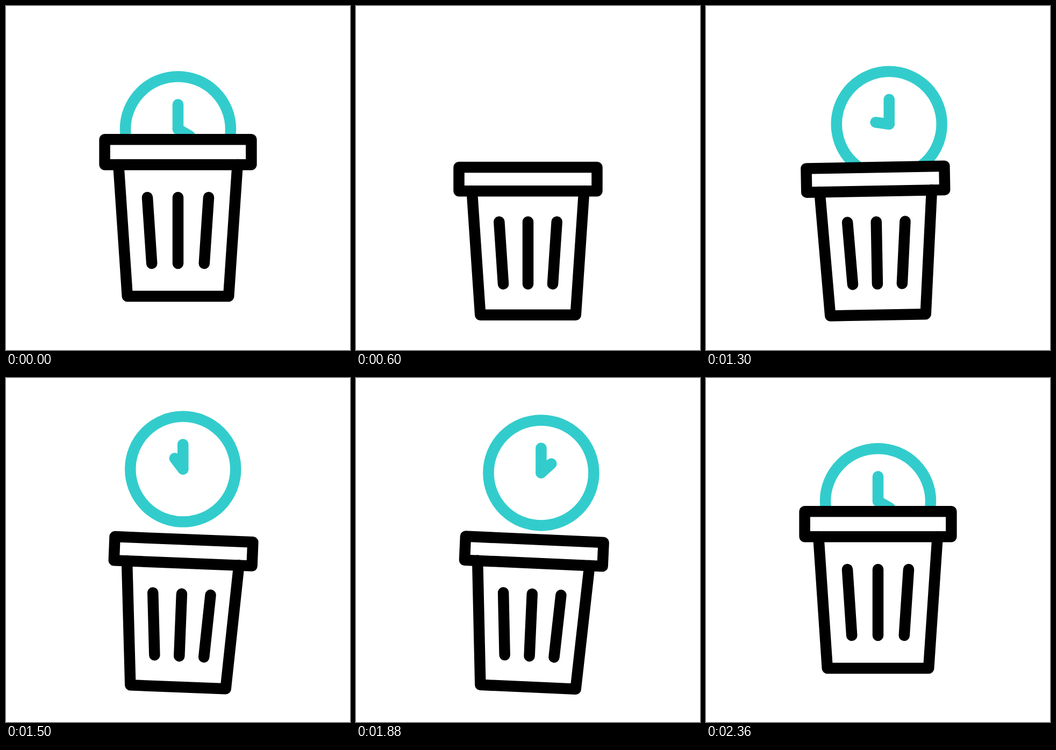
Write an HTML page that moves like this. It is 640 by 640 pixels and loops after 2.4 s.

```html
<!DOCTYPE html>
<html lang="en">
<head>
<meta charset="utf-8">
<title>Clock in a bin</title>
<style>
  html, body { margin: 0; width: 100%; height: 100%; overflow: hidden; background: #fff; }
  svg { display: block; width: 100%; height: 100%; }
  g { fill: none; stroke-width: 20.5; stroke-linecap: round; stroke-linejoin: round; }
</style>
</head>
<body>
<svg viewBox="0 0 640 640">
  <g id="clock" stroke="#33cccc">
    <circle r="98"/>
    <path d="M0 0V-46"/>
    <path id="hour" d="M0 0V-25.4"/>
  </g>
  <!-- bin coordinates start at the middle of its base -->
  <g id="bin" stroke="#000">
    <rect x="-600" y="-291.7" width="1200" height="700" fill="#fff" stroke="none"/>
    <path d="M-110.7 -245L-94.2 0H94.2L110.7 -245"/>
    <path d="M-136.4 -291.7H136.4V-244.7H-136.4Z"/>
    <path d="M-57 -184L-48.8 -61M0 -184V-61M57 -184L48.8 -61"/>
  </g>
</svg>
<script>
const LOOP = 2400;
const clock = document.getElementById('clock');
const hour = document.getElementById('hour');
const bin = document.getElementById('bin');

const smooth = p => p * p * (3 - 2 * p);
const part = (t, from, to) => Math.min(1, Math.max(0, (t - from) / (to - from)));
const ramp = (t, from, to) => smooth(part(t, from, to));

// eased swing through `count` alternating peaks, at rest before and after
function swing(t, start, step, count, peak) {
  const n = (t - start) / step;
  const k = Math.floor(n);
  const at = i => i >= 1 && i <= count ? peak(i, i % 2 ? -1 : 1) : 0;
  return at(k) + (at(k + 1) - at(k)) * smooth(n - k);
}

function draw(t) {
  const down = ramp(t, 200, 600);
  const up = ramp(t, 2000, 2362);

  const sink = down - up;
  const scale = 1 - 0.058 * sink ** 1.35;
  const tilt = swing(t, 1020, 192, 4, (i, side) => side * (i > 2 ? 4.9 : 9.7));
  bin.setAttribute('transform',
    `translate(320 ${540 + 34.8 * sink}) rotate(${tilt}) scale(${scale})`);
  bin.style.strokeWidth = 20.5 / scale;

  const x = 320 + swing(t, 1068.5, 97, 12, (i, side) => 1.5 + 63 * side);
  const y = 229.2 + 215.8 * down - 275.4 * ramp(t, 1010, 1410)
    + 8.9 * part(t, 1500, 2000) + 50.7 * up;
  clock.setAttribute('transform', `translate(${x} ${y})`);
  hour.setAttribute('transform', `rotate(${120 + 360 * part(t, 600, 2200)})`);
}

const start = performance.now();
function tick() {
  draw((performance.now() - start) % LOOP);
  requestAnimationFrame(tick);
}
tick();
</script>
</body>
</html>
```
